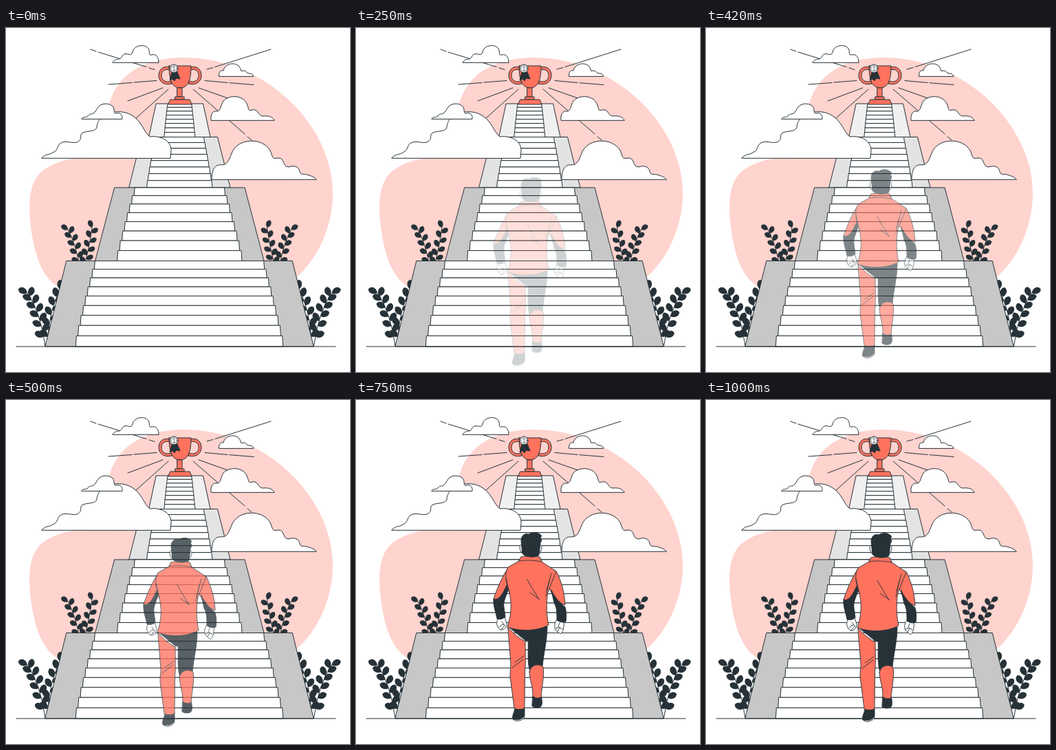
These frames come from a looping animation (500x500 px, 1040 ms). An HTML page:

```html
<!DOCTYPE html>
<html lang="en">
<head>
<meta charset="utf-8">
<title>Climb to the trophy</title>
<style>
  html, body { margin: 0; height: 100%; overflow: hidden; background: #fff; }
  svg { display: block; width: 100vw; height: 100vh; stroke: #263238; stroke-linejoin: round; stroke-linecap: round; }
  .line { fill: none; }
  .white { fill: #fff; }
  .red { fill: #ff725e; }
  .dark { fill: #263238; }
</style>
</head>
<body>
<svg viewBox="0 0 500 500">
  <path fill="#ffd3ce" stroke="none" d="M85 380C60 372 46 345 39 308C31 262 31 224 54 207C68 196 85 192 105 188C150 172 136 138 151 107C163 68 200 43 258 43C375 43 475 140 475 240C475 292 450 340 420 364L416 345H90Z"/>

  <path class="line" d="M123 31L131 34M134 35L204 56.500M208 58L216 60.500M149 82L183 79.500M186 79L219 76.500M177 106L228 87M189 131L236 89
    M385 31L304 56.500M301 57.500L292 60M289 76.500L322 79.500M325 79.700L360 82.500M280 87L328 104M272 89L347 154M351 158L357 163"/>

  <g id="plants" class="dark"></g>
  <use href="#plants" transform="matrix(-1 0 0 1 504.500 0)"/>
  <g id="stairs"></g>
  <path d="M15 463H479"/>

  <g class="white">
    <path d="M155 50C158 45 161 46 164 45C169 45 167 40 172 38C177 36 182 42 184 35C186 24 203 23 207 30C210 35 206 40 212 39C219 37 222 44 222 50Z"/>
    <path d="M309.500 70C309 63 313 61 316 62C318 52 331 49 338 55C343 60 339 64 345 62C350 62 349 66 353 66C357 66 359 67 359.500 70Z"/>
    <path d="M298 134C297 125 301 120 306 121C312 122 312 112 316 106C324 97 344 97 350 110C354 119 351 121 358 119C367 117 366 128 373 128C384 127 387 130 390 134Z"/>
    <path d="M299 220C299 205 304 198 313 199C322 199 324 192 328 182C336 160 372 158 384 178C388 187 386 191 395 189C406 188 401 202 411 202C420 199 426 202 427 209C429 215 434 211 440 214C447 216 448 217 451 220Z"/>
    <path d="M52 189C58 182 63 185 68 181C78 177 72 170 82 166C90 164 97 168 103 166C113 162 105 155 112 152C120 149 129 151 132 145C132 140 134 135 138 131C148 121 168 118 183 127C198 136 200 151 209 158C226 156 240 164 240 178L239 189Z"/>
    <path d="M110 132C112 128 116 131 119 128C121 124 124 126 127 124C131 122 131 118 134 115C139 108 152 109 156 115C158 119 156 125 160 124C166 122 170 127 169 132Z"/>
  </g>

  <g id="trophy">
    <g class="red" fill-rule="evenodd">
      <path d="M238 57C228 54 222 61 222 69C222 78 230 84 241 81L240 77C232 80 226 76 226 69C226 62 231 59 238 61Z"/>
      <path d="M268 57C278 54 284 61 284 69C284 78 276 84 265 81L266 77C274 80 280 76 280 69C280 62 275 59 268 61Z"/>
      <path d="M237 55H269C269 77 264 87 253 87C242 87 237 77 237 55Z"/>
      <path d="M249 87H256V100H249Z"/>
      <path d="M246 100H259V104H246Z"/>
      <path d="M239 104H267L270 111H236Z"/>
    </g>
    <path class="dark" d="M241 64L238 76L242 74L245 77L247 73L253 74L249 64Z"/>
    <circle class="white" cx="244" cy="59" r="6"/>
    <circle class="white" cx="244" cy="59" r="4.200" stroke-width=".6"/>
    <text x="244" y="61.500" font-family="Lato, sans-serif" font-size="7" text-anchor="middle" fill="#263238" stroke="none">1</text>
  </g>

  <g id="man" opacity="0" stroke-width=".9">
    <g class="white">
      <path d="M206 319C203 326 205 333 211 335C216 335 219 331 219 326L216 316Z"/>
      <path class="line" d="M208 331L213 327L217 329M211 335L215 330M212 323L215 327"/>
      <path d="M292 320C288 325 288 331 290 335L297 341C301 339 303 331 302 322Z"/>
      <path class="line" d="M290 333L295 331L300 334M293 337L296 332M296 325L294 330"/>
    </g>
    <g class="dark">
      <path d="M257 431L269 431C271 438 271 445 268 447C264 449 258 448 256 446Z"/>
      <path class="white" d="M228 464C229 469 240 469 245 462L243 459Z"/>
      <path d="M231 447H245V460C240 467 233 466 228 465C226 459 231 455 231 447Z"/>
      <path d="M221 330H278C278 350 273 367 271 388L269 400L254 398C248 385 251 365 250 350L247 351Z"/>
    </g>
    <g class="red">
      <path d="M221 332C230 341 238 348 246 352C246 367 247 383 245.500 397L245 449C240 451 234 451 230 449L224 403C224 393 225 389 225 385Z"/>
      <path d="M252 396C255 384 267 384 272 389C274 402 270 418 269 433C265 435 261 434 257 432C257 416 253 411 252 396Z"/>
    </g>
    <g class="red">
      <path d="M222 244C213 256 205 275 200 290C203 295 209 295 214 293L224 268Z"/>
      <path d="M288 248L292 251C298 265 303 278 304 299L289 292L279 270Z"/>
    </g>
    <g class="dark">
      <path d="M200 290C207 293 213 284 219 270L221 278C217 289 214 294 215 302L217 316C213 320 209 320 205 319C203 308 199 300 200 290Z"/>
      <path d="M284 277C290 291 299 297 304 302C306 309 306 316 305 323C301 325 296 324 292 321C292 311 292 302 288 296Z"/>
    </g>
    <path class="white" d="M241 211C237 211 237 219 241 223ZM267 211C271 211 271 219 267 223Z"/>
    <path class="red" d="M240 230L237 235L221 244C215 254 218 265 222 278C227 295 226 313 220 331C237 337 261 338 280 328C277 314 276 297 279 280L291 250L270 236L267 230Z"/>
    <path class="red" d="M240 229C249 227 259 227 267 229L270 236C259 234 248 233 237 235Z"/>
    <path class="dark" d="M242 224L240 206C240 198 245 194 251 196C256 193 263 193 265 195C269 196 271 199 268 201C271 204 269 207 268 209L266 226C264 230 245 231 242 224Z"/>
    <path class="line" d="M249 262C254 272 260 280 266 291M253 281L266 290M284 253L277 278M281 263L276 286M218 260L223 281M231 382L244 373M227 390L243 378"/>
  </g>
</svg>
<script>
  const $ = id => document.getElementById(id);
  const mix = (a, b, t) => a + (b - a) * t;

  // A stem along a quadratic curve with leaves on alternate sides
  function plant(x0, y0, cx, cy, x1, y1, pairs, size) {
    let out = `<path class="line" d="M${x0} ${y0}Q${cx} ${cy} ${x1} ${y1}"/>`;
    for (let i = 0; i <= 2 * pairs; i++) {
      const t = mix(.14, 1, i / (2 * pairs));
      const x = mix(mix(x0, cx, t), mix(cx, x1, t), t);
      const y = mix(mix(y0, cy, t), mix(cy, y1, t), t);
      const dir = Math.atan2(mix(cy - y0, y1 - cy, t), mix(cx - x0, x1 - cx, t)) * 180 / Math.PI;
      const turn = i % 2 ? 56 : mix(-52, -25, t);
      out += `<path stroke="none" transform="translate(${x} ${y}) rotate(${dir + turn}) scale(${size})" d="M0 0C3 -6 11 -7 14 -2C14 4 6 7 0 0Z"/>`;
    }
    return out;
  }
  $('plants').innerHTML =
    plant(57, 462, 50, 412, 31, 385, 5, 1) +
    plant(60, 463, 62, 410, 79, 380, 5, 1) +
    plant(107, 348, 103, 318, 90, 293, 4, .8) +
    plant(113, 348, 120, 325, 125, 290, 4, .8);

  // Each tier: centre, top, bottom, outer and inner half widths, steps, wall colour
  function tier(c, top, bottom, out0, out1, in0, in1, steps, wall) {
    let out = `<path fill="${wall}" d="M${c - out0} ${top}H${c + out0}L${c + out1} ${bottom}H${c - out1}Z"/>`;
    const edge = i => mix(top, bottom, i / steps * (.86 + .14 * i / steps));
    for (let i = 0; i < steps; i++) {
      const w = mix(in0, in1, i / (steps - 1));
      out += `<path class="white" d="M${c - w + .5} ${edge(i)}H${c + w - .5}L${c + w + .5} ${edge(i + 1)}H${c - w - .5}Z"/>`;
    }
    return out;
  }
  $('stairs').innerHTML =
    tier(252.5, 110, 158.5, 34, 44.5, 17.5, 22, 8, '#f0f0f0') +
    tier(252.5, 158.5, 232, 55, 73.5, 35.5, 47, 8, '#e3e3e3') +
    tier(252.5, 232, 338.5, 94.5, 122.5, 65.5, 90, 8, '#c7c7c7') +
    tier(252.2, 338.5, 463, 164, 195, 123, 150, 9, '#c7c7c7');

  // Cubic easing through (.4, 0) and (.4, 1.3), with a slight overshoot
  function ease(x) {
    let lo = 0, hi = 1;
    for (let i = 0; i < 24; i++) {
      const s = (lo + hi) / 2;
      if (1.2 * s * (1 - s) + s ** 3 < x) lo = s; else hi = s;
    }
    return 3.9 * lo * lo * (1 - lo) + lo ** 3;
  }

  const LOOP = 1040, FPS = 24;
  function draw(now) {
    const tick = Math.floor((now % LOOP + 4) * FPS / 1000);
    const p = tick < 3 ? 0 : ease(Math.min(1, tick / FPS));
    $('man').setAttribute('opacity', Math.min(1, p));
    $('man').setAttribute('transform', `translate(0 ${30 * (1 - p)})`);
    requestAnimationFrame(draw);
  }
  requestAnimationFrame(draw);
</script>
</body>
</html>
```
